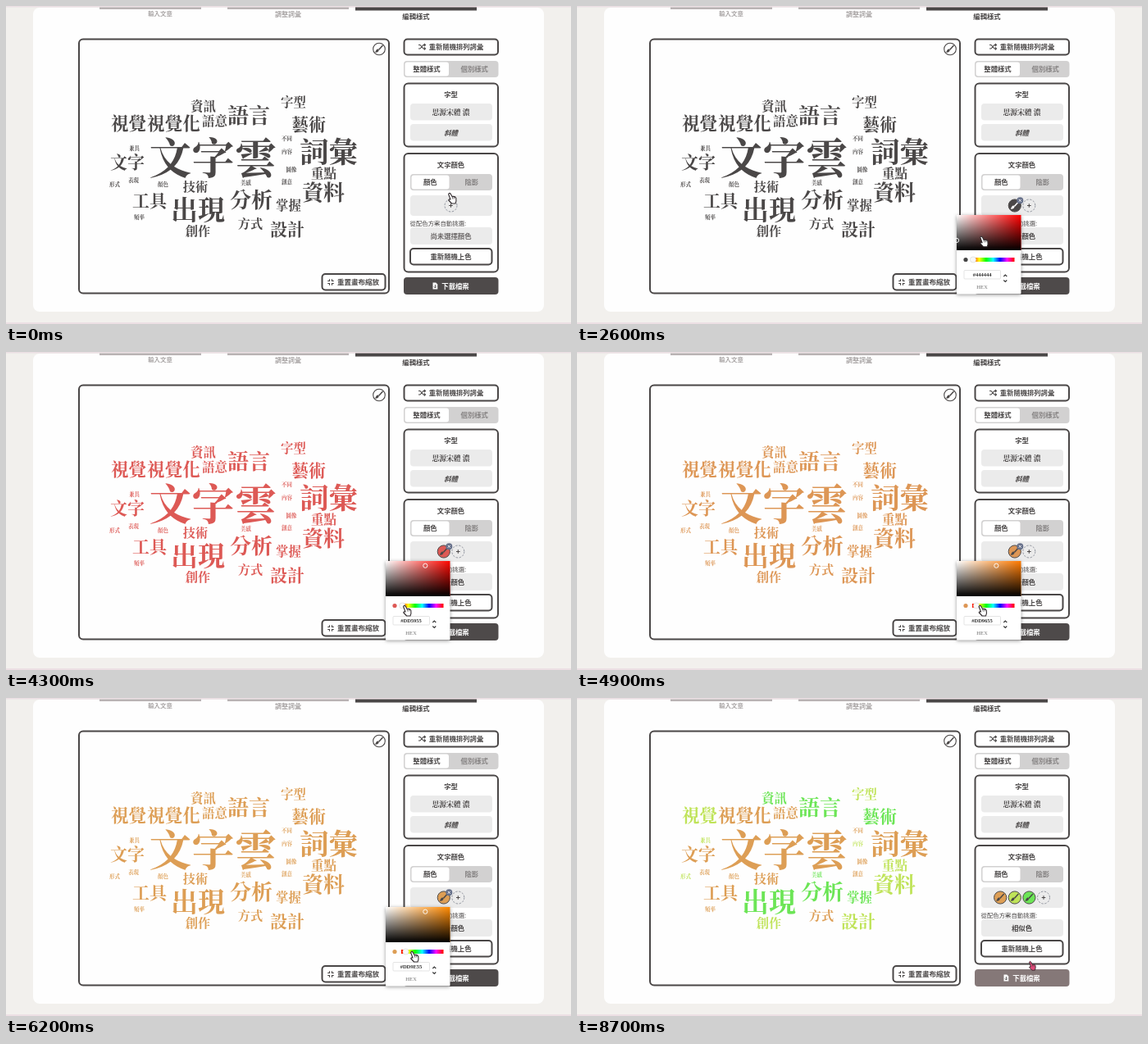
Recreate the animation shown at these times as an HTML page with a canvas. Size 689x388 px, loop 9400 ms.

```html
<!DOCTYPE html>
<html lang="zh-Hant">
<head>
<meta charset="utf-8">
<style>
html,body{margin:0;width:100%;height:100%;overflow:hidden;background:#f2f0ed}
canvas{display:block;width:689px;height:388px}
</style>
</head>
<body>
<canvas id="stage"></canvas>
<script>
const W = 689, H = 388, LOOP = 9400, LAST = 8700;
const cv = document.getElementById('stage');
const g = cv.getContext('2d');
const dpr = window.devicePixelRatio || 1;
cv.width = W * dpr;
cv.height = H * dpr;

const SANS = '"Noto Sans CJK TC","Noto Sans TC","Noto Sans CJK JP","Noto Sans CJK",sans-serif';
const SERIF = '"Noto Serif CJK TC","Source Han Serif TC","Noto Serif TC","Noto Sans CJK TC","Noto Sans CJK JP",serif';
const LATIN = '"Liberation Serif",serif';
const INK = '#4a4747', GREY = '#ebebeb', MID = '#d2d1d1', DIM = '#858282';
const PALETTE = ['#dd9e55', '#bfe358', '#6ce556'];

// text, centre x, centre y, size, final palette index
const WORDS = [
  ['文字雲', 252.5, 185, 52, 0], ['視覺', 149.5, 143, 21.6, 1], ['視覺化', 204.5, 143, 21.6, 0],
  ['資訊', 240.5, 122, 15.4, 2], ['語意', 254.5, 140, 15.4, 0], ['語言', 296, 133, 26, 2],
  ['字型', 350.5, 117, 15.4, 1], ['藝術', 369, 144, 21, 2], ['不同', 342.5, 162, 6.4, 0],
  ['內容', 342.5, 178, 6.4, 1], ['詞彙', 393.5, 177, 35.6, 0], ['兼具', 156.5, 174, 6.4, 1],
  ['文字', 148, 190, 21, 0], ['形式', 132.5, 218, 6.4, 1], ['表現', 155.5, 213, 6.4, 0],
  ['顏色', 191.5, 218, 6.4, 0], ['技術', 231, 220, 15.2, 0], ['美感', 292.5, 216, 6.4, 2],
  ['創意', 342.5, 215, 6.4, 0], ['圖像', 348, 200, 6.4, 0], ['重點', 387.5, 204, 15.4, 1],
  ['資料', 387, 227, 26, 1], ['工具', 175, 237, 21, 0], ['出現', 234, 248, 33, 2],
  ['分析', 299, 236, 26, 2], ['掌握', 344.5, 243, 15.4, 2], ['頻率', 162.5, 258, 6.4, 0],
  ['創作', 234, 274, 15.2, 1], ['方式', 298, 265, 15.2, 0], ['設計', 343, 272, 21, 1]
];

// time, fingertip x, y
const PATH = [
  [0, 539, 228], [300, 540, 237], [800, 539, 238], [1400, 533, 245], [1900, 533, 245],
  [2500, 490, 282], [3100, 505, 266], [3400, 511.5, 261], [3600, 511.5, 261], [4100, 483, 309],
  [4300, 484, 309], [4900, 489.5, 309], [5400, 494, 309], [6000, 493, 309], [6200, 493, 309],
  [6500, 563, 260], [6900, 550, 280], [7100, 550, 281], [7600, 550, 336], [7900, 549, 345],
  [8100, 549, 345], [8500, 551, 318], [8700, 551, 321]
];
const HUE = [[4200, 0], [4900, 28.7], [5400, 36], [6000, 32.2]];

function track(keys, t, i) {
  let a = keys[0];
  for (const b of keys) {
    if (t < b[0]) {
      if (a === b) return b[i];
      const u = (t - a[0]) / (b[0] - a[0]);
      return a[i] + (b[i] - a[i]) * u * u * (3 - 2 * u);
    }
    a = b;
  }
  return a[i];
}

function hsv(h, s, v) {
  const part = n => {
    const k = (n + h / 60) % 6;
    const c = v - v * s * Math.max(0, Math.min(k, 4 - k, 1));
    return Math.round(c * 255).toString(16).padStart(2, '0');
  };
  return '#' + part(5) + part(3) + part(1);
}

function text(s, x, y, size, color = INK, family = SANS, align = 'center', style = 'bold') {
  g.font = `${style} ${size}px ${family}`;
  g.textAlign = align;
  g.textBaseline = 'alphabetic';
  g.fillStyle = color;
  g.fillText(s, x, y + size * (family === LATIN ? 0.33 : 0.38));
}

function box(x, y, x2, y2, r, fill, stroke, lw = 2) {
  g.beginPath();
  g.roundRect(x, y, x2 - x, y2 - y, r);
  if (fill) { g.fillStyle = fill; g.fill(); }
  if (stroke) { g.strokeStyle = stroke; g.lineWidth = lw; g.stroke(); }
}

function disc(x, y, r, fill, stroke, lw = 1) {
  g.beginPath();
  g.arc(x, y, r, 0, 7);
  if (fill) { g.fillStyle = fill; g.fill(); }
  if (stroke) { g.strokeStyle = stroke; g.lineWidth = lw; g.stroke(); }
}

function lines(color, lw, ...paths) {
  g.strokeStyle = color;
  g.lineWidth = lw;
  g.beginPath();
  for (const p of paths)
    for (let i = 0; i < p.length; i += 2) i ? g.lineTo(p[i], p[i + 1]) : g.moveTo(p[i], p[i + 1]);
  g.stroke();
}

function tri(x, y, d) {
  g.fillStyle = '#777';
  g.beginPath();
  g.moveTo(x - 3, y + d);
  g.lineTo(x + 3, y + d);
  g.lineTo(x, y - d * 1.5);
  g.fill();
}

function brush(x, y, color) {
  lines(color, 1.5, [x + 4.5, y - 4.5, x - 0.5, y + 1]);
  g.fillStyle = color;
  g.beginPath();
  g.moveTo(x - 0.2, y + 1.6);
  g.quadraticCurveTo(x - 1, y + 4.8, x - 5, y + 4);
  g.quadraticCurveTo(x - 3.4, y + 0.2, x - 1.6, y - 0.2);
  g.fill();
}

function swatch(x, color) {
  disc(x, 243.5, 7.6, color, INK, 1);
  brush(x, 243.5, color === INK ? '#fff' : INK);
}

function plus(x) {
  g.setLineDash([2.4, 1.6]);
  disc(x, 243.5, 7.5, null, '#868b96', 0.9);
  g.setLineDash([]);
  lines(INK, 1, [x - 2.3, 243.5, x + 2.3, 243.5], [x, 241.2, x, 245.8]);
}

function tabs(x, y, x2, y2, mid, a, b) {
  box(x, y, x2, y2, 4, MID);
  box(x + 1.5, y + 1.5, mid, y2 - 1.5, 3, '#fff');
  const cy = (y + y2) / 2;
  text(a, (x + mid) / 2 + 0.5, cy, 8.4);
  text(b, (mid + x2) / 2 + 1, cy, 8.4, DIM);
}

function page() {
  g.fillStyle = '#f2f0ed';
  g.fillRect(0, 0, W, H);
  g.fillStyle = '#ecdfe4';
  g.fillRect(0, 0, W, 1.5);
  g.fillRect(0, 386, W, 2);
  box(33, 2, 656, 373, 8, '#fefefe');
  g.fillStyle = '#b9b3b4';
  g.fillRect(114, 1.5, 124, 2.5);
  g.fillRect(270, 1.5, 148, 2.5);
  g.fillStyle = INK;
  g.fillRect(426, 1.5, 148, 4);
  text('輸入文章', 188, 9.5, 7.4, '#aaa6a6');
  text('調整詞彙', 344, 9.5, 8, '#aaa6a6');
  text('編輯樣式', 500, 12.5, 8.4);

  box(89, 40.5, 467, 350.5, 5, '#fefefe', INK);
  disc(455, 52.5, 7.3, '#fff', INK, 1.1);
  brush(455, 52.5, INK);
  box(385.5, 327, 462.5, 346.5, 4, '#fff', INK);
  text('重置畫布縮放', 429.5, 337, 8.5);
  for (const a of [-1, 1]) for (const b of [-1, 1])
    lines(INK, 1.2, [396 + a * 3.8, 337 + b * 1.5, 396 + a * 1.5, 337 + b * 1.5, 396 + a * 1.5, 337 + b * 3.8]);

  box(485.5, 40.5, 600, 59.5, 4, '#fff', INK);
  lines(INK, 1.1, [503, 47.5, 505, 47.5, 509, 52, 511.5, 52], [503, 52, 505, 52, 509, 47.5, 511.5, 47.5],
    [509.8, 46, 511.5, 47.5, 509.8, 49], [509.8, 50.5, 511.5, 52, 509.8, 53.5]);
  text('重新隨機排列詞彙', 549, 50, 8.3);
  tabs(485, 67, 600.5, 87, 540, '整體樣式', '個別樣式');

  box(485.5, 94.5, 600, 171.5, 5, '#fff', INK);
  text('字型', 542.5, 108, 8.4);
  box(493, 119, 593, 139.5, 4, GREY);
  text('思源宋體 濃', 542.5, 129.5, 8.8, INK, SERIF);
  box(493, 144, 593, 164.5, 4, GREY);
  text('斜體', 542.5, 154.5, 8.4, INK, SANS, 'center', 'italic bold');

  box(485.5, 180, 600, 324.5, 5, '#fff', INK);
  text('文字顏色', 542.5, 193.5, 8.4);
  tabs(493, 205, 593, 225, 540.5, '顏色', '陰影');
  box(493, 231, 593, 256, 4, GREY);
  text('從配色方案自動挑選:', 492.5, 265, 7.4, INK, SANS, 'left', '500');
  box(493, 270, 593, 291, 4, GREY);
  box(493, 296, 592.5, 315.5, 4, '#fff', INK);
  text('重新隨機上色', 542.5, 306, 8.4);
}

function download(hover) {
  box(485, 331, 600.5, 352, 4, hover ? '#857878' : '#4e4a4a');
  g.fillStyle = '#fff';
  g.beginPath();
  g.moveTo(520.5, 337.5);
  g.lineTo(524.2, 337.5);
  g.lineTo(526.3, 339.6);
  g.lineTo(526.3, 345.5);
  g.lineTo(520.5, 345.5);
  g.fill();
  lines('#4e4a4a', 0.9, [523.4, 340, 523.4, 344], [521.9, 342.5, 523.4, 344, 524.9, 342.5]);
  text('下載檔案', 548, 341.5, 8.4, '#fff');
}

function picker(h, s, v, color) {
  g.save();
  g.shadowColor = 'rgba(0,0,0,.4)';
  g.shadowBlur = 4 * dpr;
  g.shadowOffsetY = dpr;
  box(463, 255, 541.5, 351.5, 1, '#fff');
  g.restore();
  const grad = (x, y, x2, y2, stops) => {
    const q = g.createLinearGradient(x, y, x2, y2);
    stops.forEach((c, i) => q.addColorStop(i / (stops.length - 1), c));
    g.fillStyle = q;
  };
  grad(463, 0, 541.5, 0, ['#fff', hsv(h, 1, 1)]);
  g.fillRect(463, 255, 78.5, 43);
  grad(0, 255, 0, 298, ['rgba(0,0,0,0)', '#000']);
  g.fillRect(463, 255, 78.5, 43);
  disc(463 + s * 78.5, 255 + (1 - v) * 43, 2.6, null, '#fff', 0.9);

  disc(474, 309.5, 2.6, color);
  grad(482, 0, 533, 0, ['#f00', '#ff0', '#0f0', '#0ff', '#00f', '#f0f', '#f00']);
  g.fillRect(482, 307, 51.5, 5);
  disc(483 + h / 360 * 50, 309.5, 3.6, '#f8f8f8', '#ccc', 0.5);
  box(472, 322.5, 516.5, 333, 1, '#fff', '#d8d8d8', 0.7);
  text(color.toUpperCase(), 494, 327.5, 6.5, '#333', LATIN);
  text('HEX', 494, 342.5, 6.2, '#969696', LATIN);
  lines('#333', 1.1, [520.3, 330, 522.3, 328, 524.3, 330], [520.3, 334.5, 522.3, 336.5, 524.3, 334.5]);
}

function menu(y) {
  const rows = [
    ['單一顏色', []],
    ['單色調', ['#8b7846', '#d5ac50', '#e2c67a']],
    ['相似色', ['#d8b452', '#b9df55', '#67df50']],
    ['互補色', ['#4057d8', '#dfb052']]
  ];
  const hover = Math.floor((y - 295.5) / 20.7);
  g.save();
  box(493, 295, 593, 378.5, 1, GREY);
  g.clip();
  rows.forEach(([name, dots], i) => {
    const cy = 306 + i * 20.7;
    if (!i || i === hover) {
      g.fillStyle = '#d0d0d0';
      g.fillRect(493, cy - 10.8, 92, 20.8);
    }
    text(name, 501, cy, 8.3, INK, SANS, 'left');
    dots.forEach((c, k) => disc(502 + name.length * 8.3 + 3.8 + k * 9.2, cy, 4.1, c, INK, 0.8));
  });
  g.fillStyle = '#f7f7f7';
  g.fillRect(585, 295, 8, 84);
  g.restore();
  box(586, 307.5, 591, 341, 0, '#8d8d8d');
  tri(588.5, 301.5, 1.6);
  tri(588.5, 373, -1.6);
}

function hand(x, y, pink) {
  g.save();
  g.translate(x, y);
  if (pink) g.scale(0.82, 0.86);
  g.beginPath();
  g.moveTo(0.6, 1.5);
  g.quadraticCurveTo(1.8, -0.6, 3.2, 1.2);
  g.lineTo(5, 4.6);
  g.quadraticCurveTo(8.8, 3.8, 9.8, 6.5);
  g.quadraticCurveTo(10.5, 9.8, 9, 13);
  g.lineTo(4.6, 13);
  g.lineTo(0.8, 9);
  g.quadraticCurveTo(0.6, 7.4, 3, 8);
  g.closePath();
  g.fillStyle = pink ? '#df4a79' : '#fff';
  g.fill();
  g.strokeStyle = '#332d30';
  g.lineWidth = 1.1;
  g.lineJoin = 'round';
  g.stroke();
  lines('#332d30', 0.7, [5.2, 5, 5.8, 7.6], [7.2, 5, 7.6, 7.4]);
  g.restore();
}

function draw(t) {
  const x = track(PATH, t, 1), y = track(PATH, t, 2);
  const h = track(HUE, t, 1);
  const picked = t >= 3200;
  const drag = picked && t < 3400;
  const s = drag ? (x - 463) / 78.5 : picked ? 1 - 0x55 / 0xdd : 0;
  const v = drag ? 1 - (y - 255) / 43 : picked ? 0xdd / 255 : 0.28;
  const color = picked ? hsv(h, s, v) : INK;
  const added = t >= 500, trio = t >= 8200;
  const open = t >= 1900 && t < 6500;

  g.setTransform(dpr, 0, 0, dpr, 0, 0);
  page();
  download(t >= 8500);
  for (const [w, cx, cy, size, k] of WORDS)
    text(w, cx, cy, size, trio ? PALETTE[k] : color, SERIF, 'center', '900');

  if (trio) {
    PALETTE.forEach((c, i) => swatch(516.2 + i * 17.6, c));
    plus(569);
  } else if (added) {
    swatch(533.8, color);
    plus(551.3);
    if (t >= 1000 && t < 6600) {
      disc(540.3, 237.3, 4, '#66708a');
      lines('#fff', 0.9, [538.8, 235.8, 541.8, 238.8], [541.8, 235.8, 538.8, 238.8]);
    }
  } else plus(542.5);
  text(trio ? '相似色' : added ? '單一顏色' : '尚未選擇顏色', 542.5, 281, 8.4, added ? INK : '#6d6969');

  if (open) picker(h, s, v, picked ? color : '#444444');
  if (t >= 7000 && t < 8200) menu(y);
  hand(x, y, (t >= 300 && t < 700) || (t >= 1400 && t < 1900) || t >= 6700);
}

function tick(now) {
  const t = now % LOOP;
  draw(Math.min(LAST, Math.floor(t / 100) * 100));
  requestAnimationFrame(tick);
}
draw(0);
requestAnimationFrame(tick);
</script>
</body>
</html>
```
